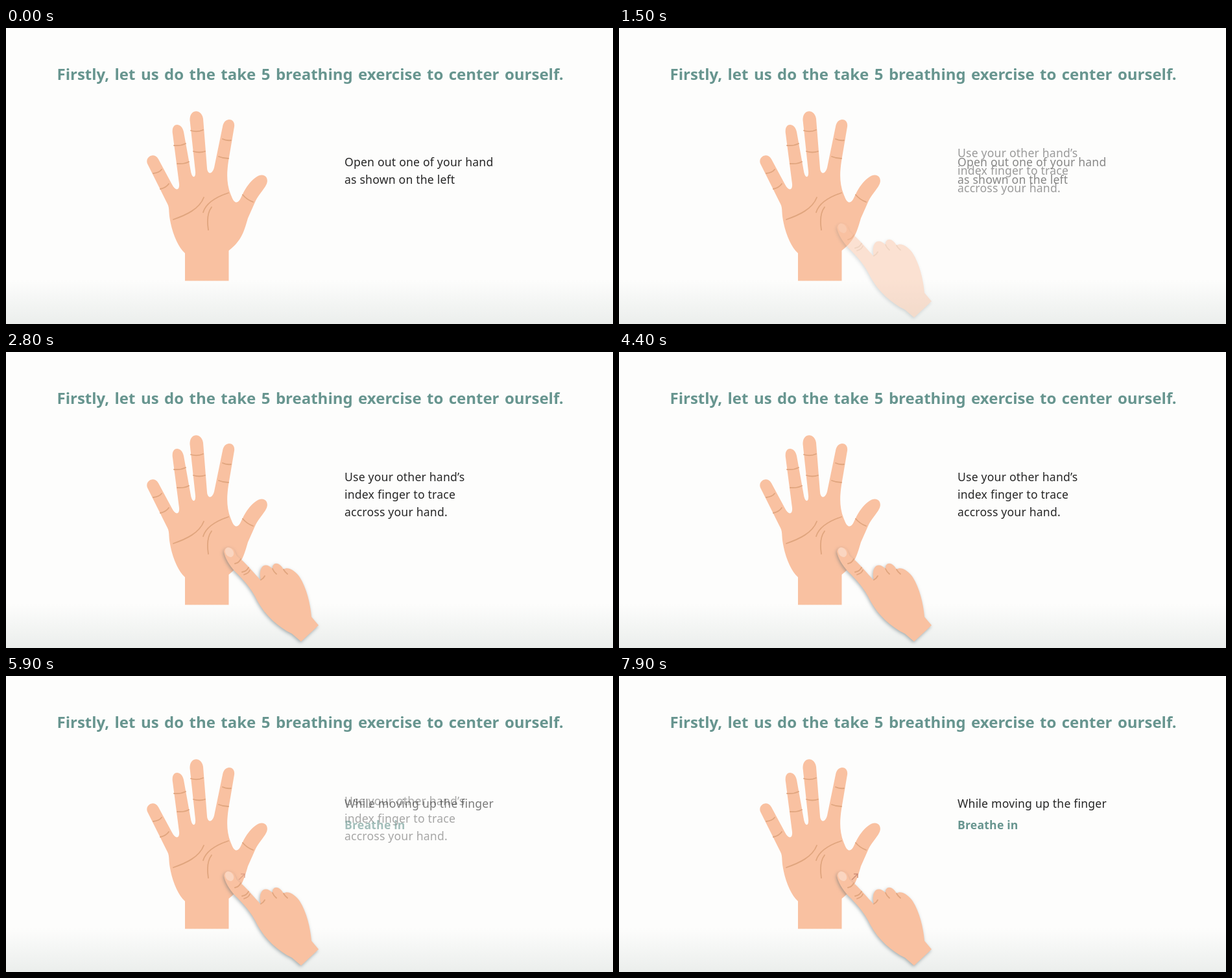
Animation of 936x456 px, one loop 8 s. Source, as an HTML page:

```html
<!DOCTYPE html>
<html lang="en">
<head>
<meta charset="utf-8">
<title>Take 5 breathing</title>
<style>
  html, body { margin: 0; width: 100%; height: 100%; overflow: hidden; background: #fdfdfc; }
  svg { display: block; width: 936px; height: 456px; font: 17.6px "Noto Sans", "Open Sans", sans-serif; letter-spacing: .2px; fill: #262626; }
  .title { font-size: 24px; font-weight: 700; letter-spacing: 0; word-spacing: 2.2px; fill: #67958f; }
  .cue { font-weight: 700; fill: #67958f; }
  .skin { fill: #f9c1a1; }
  .crease { fill: none; stroke: #e0a57e; stroke-width: 1.8; stroke-linecap: round; }
  #pointer { filter: drop-shadow(-1px 2px 2.5px rgba(90, 105, 110, .5)); }
</style>
</head>
<body>
<svg viewBox="0 0 936 456">
  <defs>
    <linearGradient id="glow" x2="0" y2="1">
      <stop offset=".85" stop-color="#fdfdfc"/>
      <stop offset="1" stop-color="#ebeeec"/>
    </linearGradient>
  </defs>
  <rect width="936" height="456" fill="url(#glow)"/>
  <text class="title" x="78.500" y="80">Firstly, let us do the take 5 breathing exercise to center ourself.</text>

  <!-- open palm -->
  <path class="skin" d="M276 389.500V347C264 336 255 312 252 290C251 280 252 276 248 269L218 209C214 199 228 190 235 202L256 241C261 251 268 251 267 240L257 163C254 145 271 145 274 160L285 221C287 232 293 232 292 221L283.500 142C283 124 302 124 304 140L310 216C311 226 318 226 321 215L334 152C337 136 354 139 352 152L343 205C340 226 340 242 348 260C352 271 358 271 362 262C369 247 375 238 384 231C396 221 406 229 402 240C398 249 390 256 385 266L373 293C367 313 364 327 343.500 343V389.500Z"/>
  <path class="crease" d="M227 224Q236 223 240 218M238 248Q247 246 251 240M259 181Q269 182 277 178M264 209Q275 210 282 206M285 158Q295 161 304 157M289 190Q298 193 307 190M334 171Q340 174 347 173M328 198Q335 201 343 201M365 257Q372 265 381 268M258 295C278 288 298 279 305 261M343 254C322 261 308 271 304 284M312 311C310 298 310 285 317 276"/>

  <!-- tracing hand -->
  <g id="pointer">
    <path class="skin" d="M336 308C336 300 346 299 351 304C354 308 354 313 358 316C369 324 382 340 393 352C391 343 391 335 396 330C401 327 406 329 411 334C410 324 421 322 428 335C435 330 446 337 453 347C463 363 469 386 471 408L482 421L455 446L441 434C420 424 400 406 388 384C378 363 366 351 353 338C344 328 338 318 336 308Z"/>
    <ellipse cx="344.500" cy="308.500" rx="6" ry="8" fill="#fad5c0" transform="rotate(-35 344.500 308.500)"/>
    <path class="crease" d="M353 326Q359 325 362 319M364 339Q371 338 374 332M367 343Q374 341 376 336M393 351Q397 349 399 345M411 334Q413 339 417 342M428 335Q430 339 434 342"/>
  </g>
  <path id="arrow" fill="none" stroke="#d08f78" stroke-width="1.500" d="M359 314L368 305M362 305H368V311"/>

  <g id="open">
    <text x="522" y="213">Open out one of your hand</text>
    <text x="522" y="240">as shown on the left</text>
  </g>
  <g id="trace">
    <text x="522" y="199">Use your other hand’s</text>
    <text x="522" y="226">index finger to trace</text>
    <text x="522" y="253">accross your hand.</text>
  </g>
  <g id="breathe">
    <text x="522" y="203">While moving up the finger</text>
    <text class="cue" x="522" y="236">Breathe in</text>
  </g>
</svg>
<script>
  const LOOP = 8000, FADE = 1700;
  const show = (id, opacity) => document.getElementById(id).style.opacity = opacity;
  const ramp = (t, start) => Math.min(1, Math.max(0, (t - start) / FADE));

  function draw(now) {
    const t = now % LOOP;
    const second = ramp(t, 730), third = ramp(t, 4880);
    show("open", 1 - second);
    show("trace", second * (1 - third));
    show("pointer", second);
    show("breathe", third);
    show("arrow", third);
    requestAnimationFrame(draw);
  }
  draw(performance.now());
</script>
</body>
</html>
```
